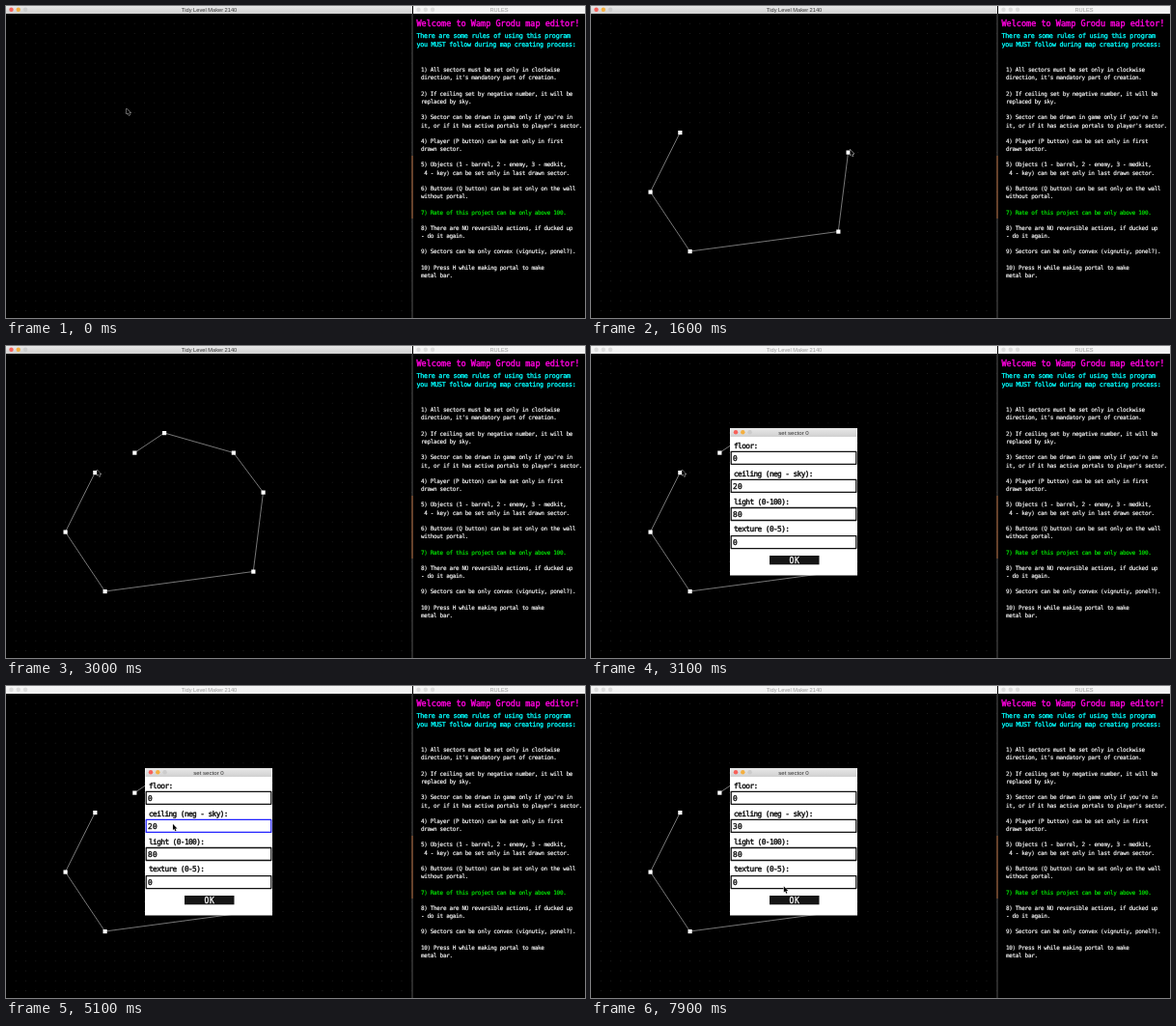
Write an HTML page with a canvas that moves like this. It is 600 by 323 pixels and loops after 8000 ms.

```html
<!DOCTYPE html>
<html lang="en">
<head>
<meta charset="utf-8">
<title>Map editor</title>
<style>
html, body { margin: 0; width: 100%; height: 100%; overflow: hidden; background: #000; }
canvas { display: block; }
</style>
</head>
<body>
<canvas id="stage" width="600" height="323"></canvas>
<script>
const ctx = document.getElementById('stage').getContext('2d');
const W = 600, H = 323, LOOP = 8000, STEP = 100;
const BAR = 8, CELL = 10.25, SPLIT = 421;
const FIRST_CLICK = 100, CLICK_GAP = 375;
const SANS = '"Liberation Sans", Arial, sans-serif';
const MONO = '"DejaVu Sans Mono", monospace';
const MONO_ADVANCE = 0.602;

const rules = `1) All sectors must be set only in clockwise
direction, it's mandatory part of creation.

2) If ceiling set by negative number, it will be
replaced by sky.

3) Sector can be drawn in game only if you're in
it, or if it has active portals to player's sector.

4) Player (P button) can be set only in first
drawn sector.

5) Objects (1 - barrel, 2 - enemy, 3 - medkit,
 4 - key) can be set only in last drawn sector.

6) Buttons (Q button) can be set only on the wall
without portal.

7) Rate of this project can be only above 100.

8) There are NO reversible actions, if ducked up
- do it again.

9) Sectors can be only convex (vignutiy, ponel?).

10) Press H while making portal to make
metal bar.`.split('\n');

// Sector outline in grid cells; one corner per click, the last click closes it
const corners = [[9, 12], [6, 18], [10, 24], [25, 22], [26, 14], [23, 10], [16, 8], [13, 10]]
  .map(([col, row]) => ({ x: col * CELL, y: BAR + row * CELL }));
const clickTime = i => FIRST_CLICK + i * CLICK_GAP;
const OPEN = clickTime(corners.length);

const moves = [...corners, corners[0]].map(({ x, y }, i) => ({
  from: clickTime(i) - 275, to: clickTime(i) - 100, x: x + 2, y: y - 3
}));
moves[0].from = 0;
moves[0].to = FIRST_CLICK;
moves.push(
  { from: 3200, to: 3900, x: 216, y: 220 },
  { from: 4200, to: 4700, x: 173, y: 143 },
  { from: 7700, to: 7950, x: 203, y: 215 }
);

const arrow = new Path2D('M0 0v6l1.4-1.2 1 2.4 1-.4-1-2.3h1.9z');

const mix = (a, b, k) => a + (b - a) * k;
const ease = k => k * k * (3 - 2 * k);

function pointer(t) {
  return moves.reduce((p, m) => {
    const k = ease(Math.min(1, Math.max(0, (t - m.from) / (m.to - m.from))));
    return { x: mix(p.x, m.x, k), y: mix(p.y, m.y, k) };
  }, { x: 125, y: 106 });
}

function rect(x, y, w, h, color) {
  ctx.fillStyle = color;
  ctx.fillRect(x, y, w, h);
}

function label(str, x, y, size, color) {
  ctx.font = `${size}px ${SANS}`;
  ctx.letterSpacing = '0px';
  ctx.textAlign = 'center';
  ctx.fillStyle = color;
  ctx.fillText(str, x, y);
}

function mono(str, x, y, size, pitch, color, weight) {
  ctx.font = `${size}px ${MONO}`;
  ctx.letterSpacing = `${pitch - size * MONO_ADVANCE}px`;
  ctx.textAlign = 'left';
  ctx.fillStyle = ctx.strokeStyle = color;
  ctx.lineWidth = weight;
  ctx.fillText(str, x, y);
  ctx.strokeText(str, x, y);
}

function titleBar(x, y, w, h, title, size, active) {
  const shade = ctx.createLinearGradient(0, y, 0, y + h);
  shade.addColorStop(0, active ? '#e8e8e8' : '#f6f6f6');
  shade.addColorStop(1, active ? '#d0d0d0' : '#f0f0f0');
  rect(x, y, w, h, shade);
  const buttons = active ? ['#f8605a', '#f5b040', '#cccccc'] : ['#dcdcdc', '#dcdcdc', '#dcdcdc'];
  buttons.forEach((color, i) => {
    ctx.fillStyle = color;
    ctx.beginPath();
    ctx.arc(x + 5.5 + i * 7.3, y + h / 2 - 0.3, 2.2, 0, 7);
    ctx.fill();
  });
  label(title, x + w / 2, y + h / 2 + size * 0.34, size, active ? '#333' : '#999');
}

function drawRules() {
  rect(SPLIT - 0.5, BAR, 1, H, '#555');
  rect(SPLIT - 0.5, 155, 1, 65, '#a0592c');
  titleBar(SPLIT + 1, 0, W - SPLIT - 1, BAR, 'RULES', 5.7, false);
  mono('Welcome to Wamp Grodu map editor!', 425.5, 21.3, 8.5, 5.12, '#f0d', 0.4);
  mono('There are some rules of using this program', 425.5, 33.3, 6.7, 3.8, '#0ff', 0.3);
  mono('you MUST follow during map creating process:', 425.5, 42.3, 6.7, 3.76, '#0ff', 0.3);
  rules.forEach((line, i) =>
    mono(line, 430, 68.3 + i * 8.18, 6, 3.27, line[0] === '7' ? '#0e0' : '#fff', 0.15));
}

function drawMap(t) {
  for (let x = CELL; x < SPLIT; x += CELL)
    for (let y = BAR + CELL; y < H; y += CELL) rect(x - 0.5, y - 0.5, 1, 1, '#1c1c1c');

  const placed = corners.filter((c, i) => t >= clickTime(i));
  ctx.strokeStyle = '#aaa';
  ctx.lineWidth = 0.7;
  ctx.beginPath();
  placed.forEach(({ x, y }) => ctx.lineTo(x, y));
  ctx.stroke();
  placed.forEach(({ x, y }) => rect(x - 2, y - 2, 4.2, 4.2, '#fff'));
}

// Backspace twice, then type the new height
function ceiling(t) {
  if (t < 5600) return t < 5500 ? '20' : '2';
  if (t < 6800) return '';
  return t < 7100 ? '3' : '30';
}

function drawDialog(t, hover) {
  rect(144, 85, 132, 152.5, '#fff');
  titleBar(144.5, 85, 131, 9, 'set sector 0', 6.1, true);

  const fields = {
    'floor:': '0', 'ceiling (neg - sky):': ceiling(t), 'light (0-100):': '80', 'texture (0-5):': '0'
  };
  Object.entries(fields).forEach(([name, value], i) => {
    const y = 109.3 + i * 29.1;
    const focused = i === 1 && t >= 4800 && t < 7300;
    mono(name, 148, 106 + i * 28.8, 7.8, 4.1, '#111', 0.4);
    ctx.strokeStyle = focused ? '#22f' : '#111';
    ctx.lineWidth = 1.3;
    ctx.strokeRect(145.2, y, 129.6, 13);
    mono(value, 147, y + 9.6, 7.8, 4.9, '#111', 0.4);
  });

  rect(185, 217, 51.5, 9.3, '#151515');
  if (hover) rect(186, 218, 49.5, 7.3, '#3a3a3a');
  mono('OK', 205.5, 224.8, 8, 5.4, '#fff', 0.3);
}

function drawPointer({ x, y }) {
  ctx.save();
  ctx.translate(x, y);
  ctx.strokeStyle = '#ddd';
  ctx.lineWidth = 0.9;
  ctx.stroke(arrow);
  ctx.fillStyle = '#000';
  ctx.fill(arrow);
  ctx.restore();
}

function draw(now) {
  const t = Math.floor((now % LOOP) / STEP) * STEP;
  const open = t >= OPEN;
  const p = pointer(t);
  rect(0, 0, W, H, '#000');
  drawMap(t);
  titleBar(0, 0, SPLIT, BAR, 'Tidy Level Maker 2140', 5.7, !open);
  drawRules();
  if (open) drawDialog(t, p.x > 185 && p.x < 237 && p.y > 217 && p.y < 226);
  drawPointer(p);
}

ctx.lineJoin = 'round';
ctx.fontKerning = 'none';
const start = performance.now();
function tick() {
  draw(performance.now() - start);
  requestAnimationFrame(tick);
}
tick();
</script>
</body>
</html>
```
